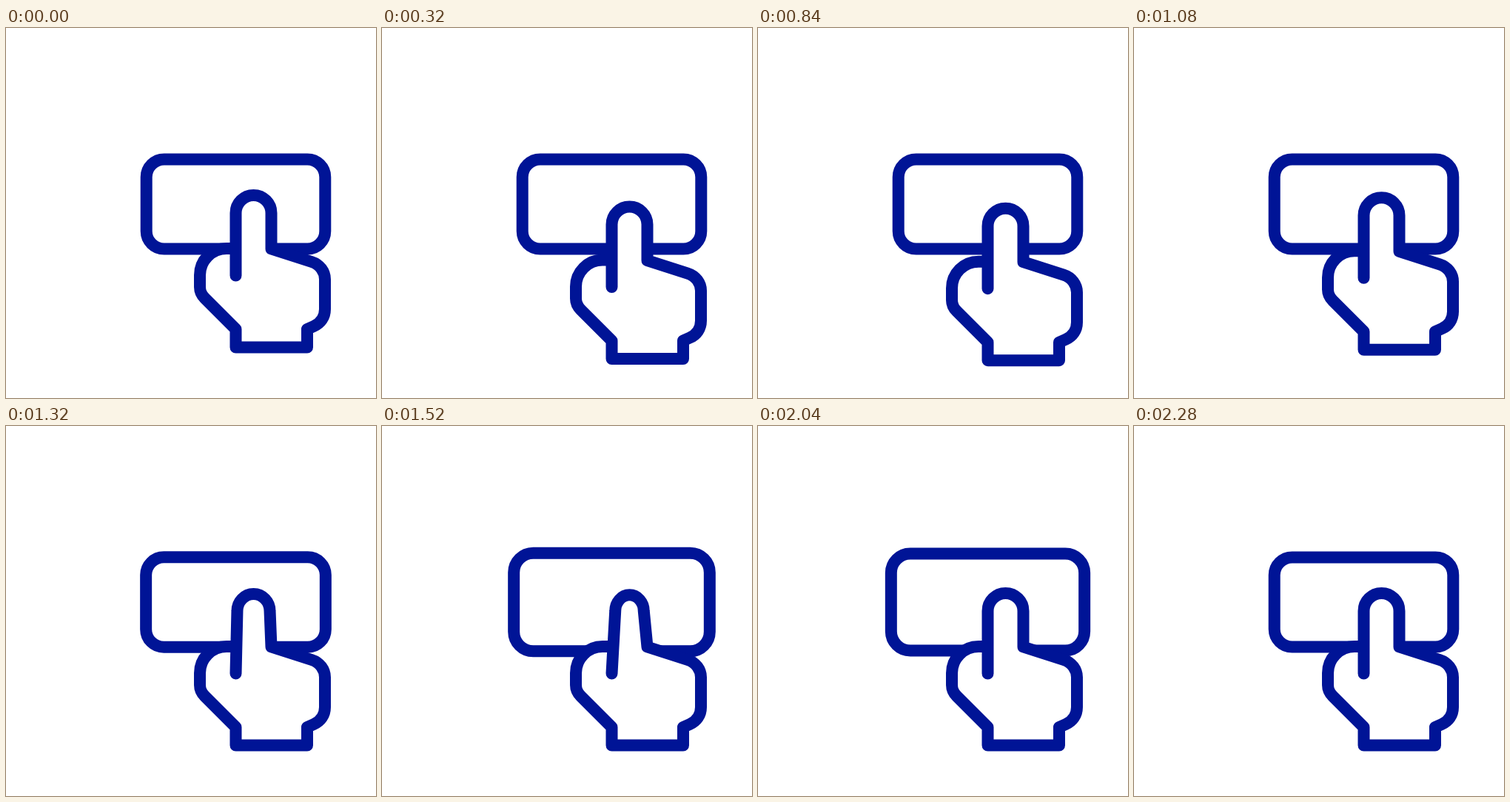
An HTML page for the animation above (3000 ms loop, 500 by 500 pixels).

```html
<!DOCTYPE html>
<html lang="en">
<head>
<meta charset="utf-8">
<title>Button press</title>
<style>
  html, body { margin: 0; width: 100%; height: 100%; overflow: hidden; background: #fff; }
  svg { display: block; width: 100%; height: 100%; }
</style>
</head>
<body>
<svg viewBox="0 0 500 500" fill="#fff" stroke="#001496" stroke-width="16" stroke-linecap="round" stroke-linejoin="round">
  <rect id="button" x="-120.8" y="-60.5" width="241.6" height="121" rx="24"/>
  <path id="hand"/>
</svg>
<script>
const LOOP = 3000, STEP = 40;
const button = document.getElementById('button');
const hand = document.getElementById('hand');

// Eased progress from 0 to 1 between two times
function ease(t, from, to) {
  const x = Math.min(1, Math.max(0, (t - from) / (to - from)));
  return x * x * (3 - 2 * x);
}

// There-and-back progress
const swing = (t, a, b, c, d) => ease(t, a, b) - ease(t, c, d);

function handPath(pinch) {
  const r = 24 - pinch, left = 310.5 + pinch, right = 358.5 - pinch;
  return `M310.5 334.5 L${left} 250 A${r} ${24 - pinch / 2} 0 0 1 ${right} 250 L358.5 298.5
    L413 316 C424 319.5 431 329 431 339.5 V380 C431 391 425 399 416 403 L407 407
    V431.5 H310.5 V407 L268.5 365 C264.5 361 262 356 262 350 V334
    C262 314 278 298 298 298 H310.5`;
}

function draw(t) {
  const drop = 24.7 * swing(t, 0, 545, 640, 1210);
  const pinch = 5 * swing(t, 1200, 1480, 1480, 1760);
  const scale = 1 + 0.188 * swing(t, 1275, 1760, 1760, 2275);
  button.setAttribute('transform', `translate(310.5 238) scale(${scale})`);
  button.setAttribute('stroke-width', 16 / scale);
  hand.setAttribute('d', handPath(pinch));
  hand.setAttribute('transform', `translate(0 ${drop})`);
}

const start = performance.now();
function tick() {
  const t = (performance.now() - start) % LOOP;
  draw(Math.floor(t / STEP) * STEP);
  requestAnimationFrame(tick);
}
tick();
</script>
</body>
</html>
```
